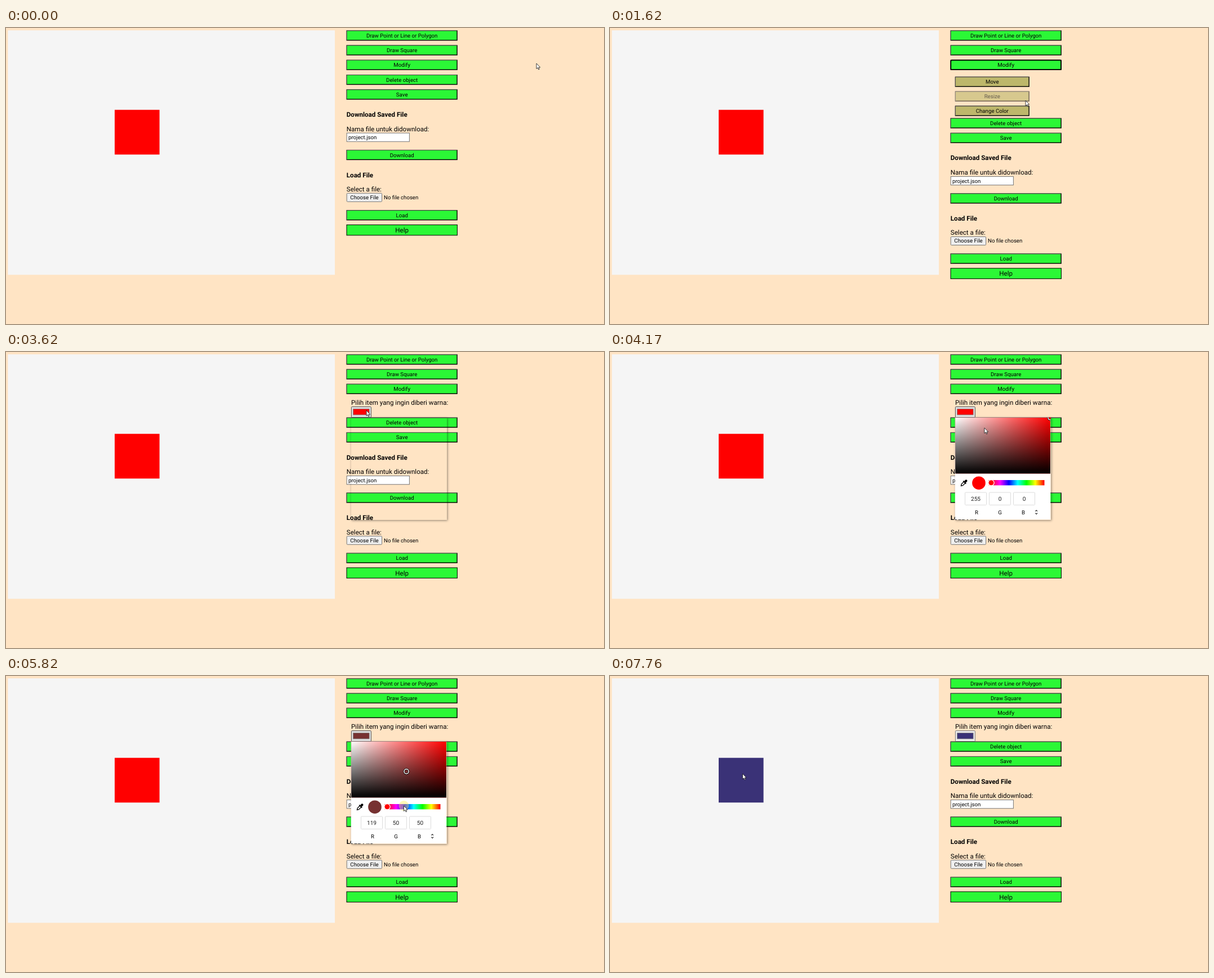
Recreate the animation shown at these times as an HTML page. Size 1062 by 527 pixels, loop 9000 ms.

```html
<!DOCTYPE html>
<html lang="id">
<head>
<meta charset="utf-8">
<title>Shape editor</title>
<style>
  html, body { margin: 0; width: 100%; height: 100%; overflow: hidden; background: #ffe4c4; }
  svg { position: absolute; left: 0; top: 0; display: block; }
  text { font-family: Roboto, Arial, sans-serif; font-size: 11.6px; text-rendering: geometricPrecision; }
  .small { font-size: 9.67px; }
  .num { font-size: 10.15px; fill: #222; }
  .mid { text-anchor: middle; }
  .bold { font-weight: 700; }
  .field { fill: #fff; stroke: #767676; }
  .grey { fill: #efefef; stroke: #767676; }
  .box { fill: #fff; stroke: #dcdcdc; }
  .over { fill: #e3e3e3; stroke: #4f4f4f; }
  #shadow { position: absolute; left: 612.5px; top: 116.5px; width: 170px; height: 182px;
    box-shadow: 0.5px 1px 4px rgba(0, 0, 0, .45); }
</style>
</head>
<body>
<svg id="page" width="1062" height="527">
  <rect x="3.4" y="4.2" width="580.6" height="435.2" fill="#f5f5f5"/>
  <rect id="square" x="193" y="145.7" width="79.6" height="79.6"/>
  <g id="top"></g>
  <g id="modes"></g>
  <g id="paint">
    <text x="613" y="94">Pilih item yang ingin diberi warna:</text>
    <rect id="well" x="613.4" y="97.5" width="35" height="19" rx="1"/>
    <rect id="swatch" x="616.7" y="101.3" width="28.4" height="10.6" stroke="#777" stroke-width=".8"/>
  </g>
  <g id="rest">
    <text class="bold" x="604.8" y="158">Download Saved File</text>
    <text x="604.8" y="183.6">Nama file untuk didownload:</text>
    <rect class="field" x="605.2" y="187" width="111.2" height="15.2"/>
    <text class="small" x="608" y="198.2">project.json</text>
    <text class="bold" x="604.8" y="265.5">Load File</text>
    <text x="604.8" y="291">Select a file:</text>
    <rect class="grey" x="605.2" y="294.2" width="62.4" height="15" rx="1.4"/>
    <text class="small mid" x="636.5" y="305">Choose File</text>
    <text class="small" x="671" y="305">No file chosen</text>
    <rect x="605" y="350.4" width="196.4" height="18.6" fill="#2bf836" stroke="#000"/>
    <text class="mid" x="703.2" y="364">Help</text>
  </g>
</svg>

<div id="shadow"></div>

<svg width="1062" height="527">
  <defs>
    <linearGradient id="white">
      <stop offset="0" stop-color="#fff"/><stop offset="1" stop-color="#fff" stop-opacity="0"/>
    </linearGradient>
    <linearGradient id="black" x2="0" y2="1">
      <stop offset="0" stop-opacity="0"/><stop offset="1"/>
    </linearGradient>
    <linearGradient id="rainbow" gradientUnits="userSpaceOnUse" x1="677" x2="771"></linearGradient>
    <clipPath id="frame"><rect x="612.5" y="116.5" width="170" height="182"/></clipPath>
  </defs>
  <g id="picker" clip-path="url(#frame)">
    <rect x="612.5" y="116.5" width="170" height="182" fill="#fff"/>
    <g id="field"></g>
    <g id="thumb">
      <circle r="5.6"/><circle r="4.8" fill="#fff"/><circle r="3.3"/><circle id="dot" r="2.7"/>
    </g>
    <g transform="translate(628.6 233.2) rotate(45)">
      <path d="M-1.7 -1V4.6L0 7.2L1.7 4.6V-1" fill="#fff" stroke="#000" stroke-width="1.3"/>
      <rect x="-3.5" y="-2.6" width="7" height="1.9"/>
      <rect x="-2" y="-7.4" width="4" height="5.4" rx="1.8"/>
    </g>
    <circle id="preview" cx="655" cy="233.2" r="11.8"/>
    <rect x="672.5" y="228" width="99" height="9.4" fill="url(#rainbow)"/>
    <circle id="knob" cy="232.8" r="5.2" stroke="#fff" stroke-width="1.3"/>
    <g id="values"></g>
    <path d="M755.3 283.7L757.2 281.8L759.1 283.7M755.3 286.7L757.2 288.6L759.1 286.7" fill="none" stroke="#222" stroke-width="1.1"/>
  </g>
  <circle id="press" r="9"/>
  <path id="cursor" d="M0 0V9.6L2.2 7.6L3.7 11L5.2 10.4L3.8 7.1H6.7Z" fill="#fff" stroke="#111" stroke-width=".8"/>
</svg>

<script>
const LOOP = 9000;
const $ = id => document.getElementById(id);

function add(parent, tag, attrs, text) {
  const el = document.createElementNS('http://www.w3.org/2000/svg', tag);
  for (const key in attrs) el.setAttribute(key, attrs[key]);
  if (text) el.textContent = text;
  parent.append(el);
  return el;
}
const set = (id, attrs) => { for (const key in attrs) $(id).setAttribute(key, attrs[key]); };
const show = (id, on) => { $(id).style.display = on ? '' : 'none'; };

// Buttons with an outset border
const buttons = [];
function button(group, x, mid, w, label, fill) {
  const g = add($(group), 'g', {}), h = 18.2, y = mid - h / 2, b = 1.4;
  add(g, 'rect', { x, y, width: w, height: h });
  add(g, 'path', { d: `M${x} ${y + h}V${y}H${x + w}l${-b} ${b}L${x + b} ${y + h - b}Z`, fill: '#4c4c4c' });
  add(g, 'rect', { x: x + 1.1, y: y + 1.1, width: w - 1.1 - b, height: h - 1.1 - b, fill });
  add(g, 'text', { x: x + w / 2, y: mid + 3.5, class: 'small mid' }, label);
  buttons.push({ g, group, x, y, w, h });
  return g;
}
const wide = (group, mid, label) => button(group, 604.6, mid, 197.2, label, '#2bf836');
wide('top', 13.4, 'Draw Point or Line or Polygon');
wide('top', 39.6, 'Draw Square');
const modify = wide('top', 65.8, 'Modify');
const ring = add(modify, 'rect', { x: 605.3, y: 57.4, width: 195.8, height: 16.8, rx: 2, fill: 'none', stroke: '#000', 'stroke-width': 1.7 });
['Move', 'Resize', 'Change Color'].forEach((label, i) =>
  button('modes', 612.8, 95.8 + i * 25.9, 132, label, '#bdb76b'));
wide('rest', 92.1, 'Delete object');
wide('rest', 118.4, 'Save');
wide('rest', 226, 'Download');
wide('rest', 333.3, 'Load');

// Colour picker
const area = { x: 613.2, y: 116.8, width: 168.8, height: 99.6 };
const hueRect = add($('field'), 'rect', area);
add($('field'), 'rect', { ...area, fill: 'url(#white)' });
add($('field'), 'rect', { ...area, fill: 'url(#black)' });
for (let i = 0; i <= 6; i++)
  add($('rainbow'), 'stop', { offset: i / 6, 'stop-color': `hsl(${360 - i * 60} 100% 50%)` });
const values = [...'RGB'].map((name, i) => {
  const x = 630.5 + i * 43;
  add($('values'), 'rect', { x, y: 250, width: 38, height: 22.4, rx: 1, class: 'box' });
  add($('values'), 'text', { x: 651 + i * 41.5, y: 288.8, class: 'small mid' }, name);
  return add($('values'), 'text', { x: x + 19, y: 264.9, class: 'num mid' });
});

// Pointer moves: start, end, steps, then evenly timed points
const moves = [
  [220, 1000, 11, [942, 63], [745, 66]],
  [1470, 1850, 6, [745, 66], [738, 129], [725, 152]],
  [2620, 3010, 6, [725, 152], [640, 104]],
  [4020, 4320, 5, [640, 104], [678.5, 152]],
  [4640, 5500, 12, [678.5, 152], [695.73, 163.67], [705, 169], [711.07, 169.92]],
  [5570, 5820, 4, [711.07, 169.92], [706.5, 231]],
  [6050, 6910, 12, [706.5, 231], [600, 200], [470, 172], [395, 175], [440, 186], [509, 191]],
  [6990, 7300, 5, [509, 191], [370, 165], [260, 160], [235.5, 174]]
];

function pointer(t) {
  let at = moves[0][3];
  for (const [start, end, steps, ...pts] of moves) {
    if (t < start) break;
    const dt = (end - start) / (steps - 1);
    let u = Math.min(1, (Math.floor((t - start + 6) / dt) + 1) / steps);
    if (pts.length === 2) u = u * u * (3 - 2 * u);
    const p = u * (pts.length - 1), i = Math.min(Math.floor(p), pts.length - 2), f = p - i;
    at = [0, 1].map(k => pts[i][k] + (pts[i + 1][k] - pts[i][k]) * f);
  }
  return at;
}

function rgb(h, s, v) {
  return [5, 3, 1].map(n => {
    const k = (n + h / 60) % 6;
    return Math.round(255 * v * (1 - s * Math.max(0, Math.min(k, 4 - k, 1))));
  });
}

const within = (t, a, b) => t >= a && t < b;

function pressStyle(t) {
  if (within(t, 5820, 5890)) return ['#fff060', .45];
  const down = within(t, 2390, 2470) || within(t, 3560, 3620) || within(t, 4490, 5500) ||
    within(t, 5890, 6050) || within(t, 7600, 7760);
  return ['#e8cc00', down ? .7 : 0];
}

function draw(t) {
  const [x, y] = pointer(t);
  const modes = within(t, 1150, 2390), paint = t >= 2390;
  const open = within(t, 3620, 7600), ready = within(t, 3770, 7600);
  const shift = { top: 0, modes: 0, rest: modes ? 77.4 : paint ? 33.6 : 0 };

  show('modes', modes);
  show('paint', paint);
  show('shadow', open);
  show('picker', ready);
  ring.style.display = modes ? '' : 'none';
  set('rest', { transform: `translate(0 ${shift.rest})` });

  const live = !open && !within(t, 2390, 2470);
  for (const b of buttons) {
    const top = b.y + shift[b.group];
    const hit = live && (b.group !== 'modes' || modes) &&
      x >= b.x && x < b.x + b.w && y >= top && y < top + b.h;
    b.g.setAttribute('opacity', hit ? .6 : 1);
  }
  const overWell = open ? x > 604 : x > 613 && x < 649 && y > 97 && y < 117;
  set('well', { class: overWell ? 'over' : 'grey' });

  // Current colour follows the drag, then the hue click
  const hue = t >= 5890 ? 246.96 : 0;
  const [px, py] = t < 4490 ? [area.x + area.width, area.y] : pointer(Math.min(t, 5500));
  const parts = rgb(hue, (px - area.x) / area.width, 1 - (py - area.y) / area.height);
  const color = `rgb(${parts})`, pure = `rgb(${rgb(hue, 1, 1)})`;
  for (const id of ['swatch', 'preview', 'dot']) set(id, { fill: color });
  set('square', { fill: t >= 7760 ? color : '#f00' });
  hueRect.setAttribute('fill', pure);
  set('thumb', { transform: `translate(${px} ${py})` });
  set('knob', { cx: 677 + (hue ? (360 - hue) / 360 * 94 : 0), fill: pure });
  values.forEach((el, i) => { el.textContent = parts[i]; });

  const [tint, alpha] = pressStyle(t);
  set('press', { cx: x, cy: y, fill: tint, opacity: alpha });
  set('cursor', { transform: `translate(${x} ${y})` });
}

const begin = performance.now();
function tick() {
  draw((performance.now() - begin) % LOOP);
  requestAnimationFrame(tick);
}
tick();
</script>
</body>
</html>
```
